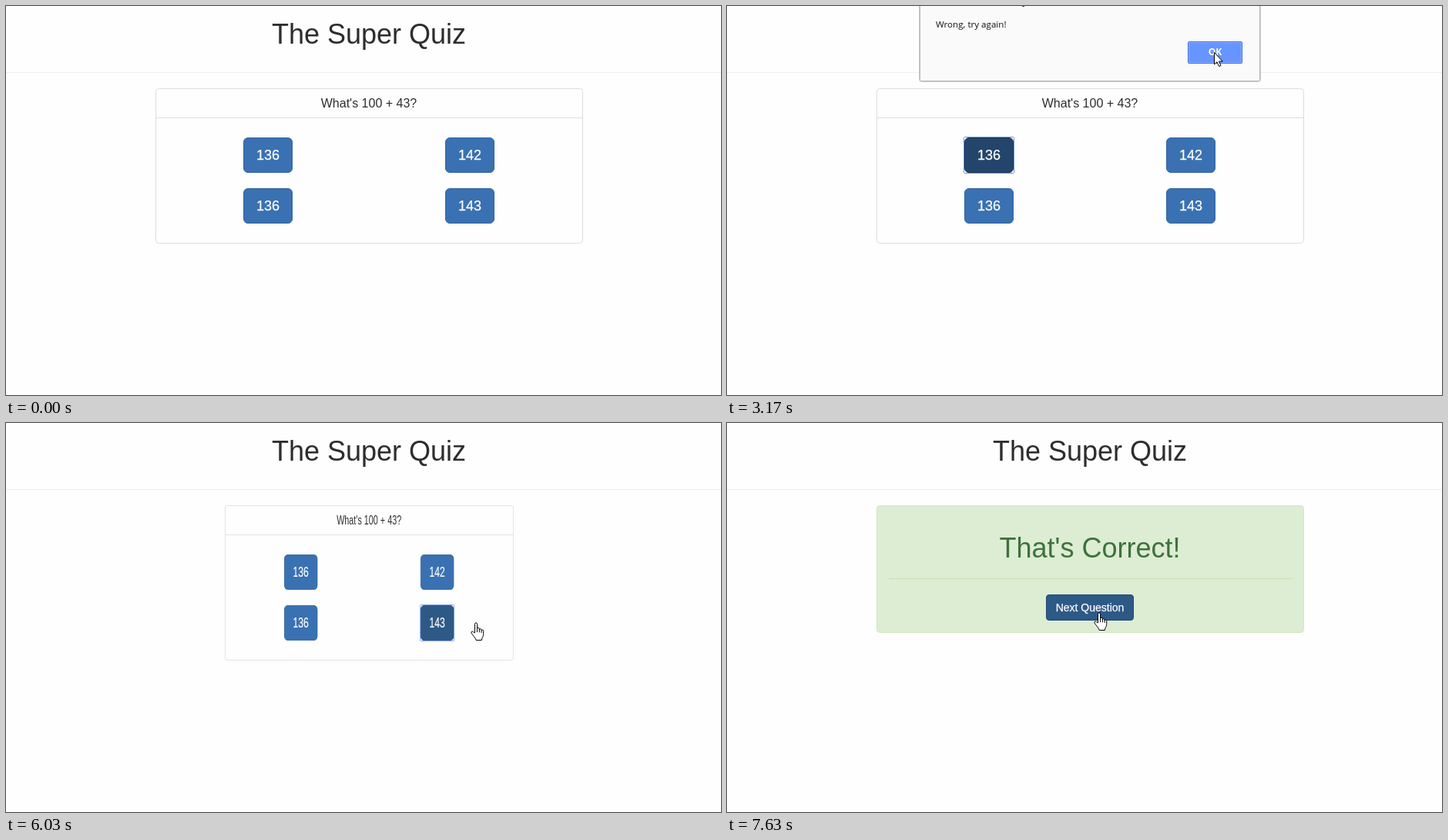
An HTML page that plays this animation: 928 px wide and 506 px high, repeating every 8 s.

```html
<!DOCTYPE html>
<html lang="en">
<head>
<meta charset="utf-8">
<title>Quiz</title>
<style>
  html, body { margin: 0; width: 100%; height: 100%; overflow: hidden; background: #fefefe; }
  svg { display: block; width: 928px; height: 506px; }
  text { font-family: "Liberation Sans", Arial, sans-serif; text-anchor: middle; fill: #2d2d2d; }
  .heading { font-size: 36px; }
  .face { fill: #3a71b2; stroke: #31659f; }
  .button text { fill: #fff; stroke: #fff; stroke-width: .25px; }
  .ring { display: none; fill: none; stroke: #6d97e6; }
  .hot .face { fill: #2d5987; stroke: #234a73; }
  .active .face { fill: #24456b; stroke: #1a3453; }
  .focus .ring { display: inline; }
  .line { fill: none; stroke: #ddd; }
  #dialog text { font-family: "Open Sans", "Noto Sans", sans-serif; fill: #111; }
  #cursor path { fill: #fff; stroke: #000; stroke-linejoin: round; }
</style>
</head>
<body>
<svg viewBox="0 0 928 506">
  <rect width="928" height="506" fill="#fefefe"/>
  <text class="heading" x="471" y="49">The Super Quiz</text>
  <path d="M0 86.5H928" stroke="#eee"/>

  <g id="front">
    <rect class="line" x="194.5" y="107.5" width="554" height="201" rx="4"/>
    <path class="line" d="M195 145.5H748"/>
    <text x="471" y="132" font-size="16">What's 100 + 43?</text>
  </g>

  <g id="back">
    <rect x="194.5" y="107.5" width="554" height="165" rx="4" fill="#dcedd3" stroke="#d3e6c1"/>
    <text class="heading" x="471" y="175" style="fill:#3f713c">That's Correct!</text>
    <path d="M210 202.5H734" stroke="#c8e1b0"/>
  </g>

  <g id="dialog">
    <rect x="249.5" y="-40" width="443" height="138.5" rx="3" fill="none" stroke="#000" stroke-opacity=".2"/>
    <rect x="250.5" y="-40" width="441" height="137.5" rx="2" fill="#fafafa" stroke="#b8b8b8"/>
    <text x="387" y="-3" font-size="15">y</text>
    <text x="271" y="28" font-size="11.6" style="text-anchor:start">Wrong, try again!</text>
    <rect x="598.5" y="46.5" width="70" height="28" rx="1" fill="#6695ff" stroke="#3f6fd9"/>
    <rect x="599.5" y="47.5" width="68" height="26" fill="none" stroke="#8aacff"/>
    <text x="633.5" y="64" font-size="12" font-weight="700" style="fill:#fff">OK</text>
  </g>

  <g id="cursor">
    <path id="arrow" d="M.5 .5V16L4 12.8L6.6 18.6L9 17.5L6.5 12H11.3Z"/>
    <path id="hand" transform="translate(-7 -1)" d="M5.5 14V2.4a1.5 1.5 0 0 1 3 0V8.5a1.4 1.4 0 0 1 2.8 .3V10a1.4 1.4 0 0 1 2.8 .3V11.3a1.3 1.3 0 0 1 2.6 .3V15.5c0 3.4-2 4.4-2.4 8H7.2c-.4-3-4.8-6.6-6.2-9.4c-.7-1.8 1.2-2.7 2.4-1.4ZM8.5 8.5V13M11.3 10V13.4M14.1 11.3V14"/>
  </g>
</svg>
<script>
const LOOP = 8000, STEP = 73, CENTER = 471.5;
const PRESS = 2140, DISMISS = 4030, ANSWER = 5740, FLIP = 5820, FLIP_TIME = 1157;

// Pointer gestures: time span, destination and how far the path bows out
const ENTRY = { x: 626, y: 408 };
const MOVES = [
  { from: 260, to: 700, x: 326, y: 190, bow: [-140, 0] },
  { from: 1230, to: 1830, x: 342, y: 199, bow: [6, 9] },
  { from: PRESS, to: 2360, x: 342, y: 199 },
  { from: 2510, to: 2940, x: 630, y: 68, bow: [64, -46] },
  { from: 3090, to: 3170, x: 632, y: 60 },
  { from: DISMISS, to: 4530, x: 450, y: 155, bow: [0, 12] },
  { from: 5070, to: 5810, x: 612, y: 260, bow: [20, 50] },
  { from: 5890, to: 6690, x: 591, y: 261 },
  { from: 6770, to: 7560, x: 483, y: 247 }
];

const $ = id => document.getElementById(id);
const clamp = v => Math.max(0, Math.min(1, v));
const smooth = k => k * k * (3 - 2 * k);
const between = (t, from, to) => t >= from && t < to;

function makeButton(parent, label, x, y, w, h, size, radius) {
  const node = document.createElementNS("http://www.w3.org/2000/svg", "g");
  node.innerHTML = `
    <rect class="face" x="${x + .5}" y="${y + .5}" width="${w - 1}" height="${h - 1}" rx="${radius}"/>
    <rect class="ring" x="${x - .5}" y="${y - .5}" width="${w + 1}" height="${h + 1}" rx="1"/>
    <text x="${x + w / 2}" y="${y + h / 2 + size / 3}" font-size="${size}">${label}</text>`;
  parent.append(node);
  const contains = p => between(p.x, x, x + w) && between(p.y, y, y + h);
  return { node, contains };
}

const answers = ["136", "142", "136", "143"].map((label, i) =>
  makeButton($("front"), label, i % 2 ? 570 : 308, i < 2 ? 171 : 237, 64, 46, 18, 5.5));
const next = makeButton($("back"), "Next Question", 414, 223, 114, 34, 14, 3.5);
const [wrong, , , right] = answers;

function setState(button, states) {
  const active = Object.keys(states).filter(name => states[name]);
  button.node.setAttribute("class", ["button", ...active].join(" "));
}

function show(node, visible) {
  node.setAttribute("display", visible ? "inline" : "none");
}

// The screen refreshes in even steps while something moves and rests in between
function snap(t, move) {
  if (!move) return 0;
  const span = move.to - move.from, steps = Math.round(span / STEP);
  const step = Math.floor((t - move.from) / span * steps + .15);
  return move.from + span * Math.min(1, step / steps);
}

function pointerAt(t, index) {
  if (index < 0) return ENTRY;
  const start = MOVES[index - 1] || ENTRY, move = MOVES[index];
  const [bowX, bowY] = move.bow || [0, 0];
  const k = smooth((t - move.from) / (move.to - move.from)), arc = Math.sin(Math.PI * k);
  return {
    x: Math.round(start.x + (move.x - start.x) * k + bowX * arc),
    y: Math.round(start.y + (move.y - start.y) * k + bowY * arc)
  };
}

// cubic-bezier(.25, .1, .25, 1)
function ease(x) {
  const curve = (s, a, b) => 3 * (1 - s) ** 2 * s * a + 3 * (1 - s) * s * s * b + s ** 3;
  let low = 0, high = 1;
  for (let i = 0; i < 24; i++) {
    const mid = (low + high) / 2;
    if (curve(mid, .25, .25) < x) low = mid; else high = mid;
  }
  return curve(low, .1, 1);
}

function flipTo(node, scale) {
  show(node, scale > .002);
  node.setAttribute("transform", `translate(${CENTER} 0) scale(${scale} 1) translate(${-CENTER} 0)`);
}

function render(time) {
  const index = MOVES.filter(move => move.from <= time).length - 1;
  const t = snap(time, MOVES[index]);
  const pointer = pointerAt(t, index);

  const turn = Math.cos(Math.PI * ease(clamp((t - FLIP) / FLIP_TIME)));
  flipTo($("front"), turn);
  flipTo($("back"), -turn);

  const hovered = (turn > 0 ? answers : [next]).find(button => button.contains(pointer));
  const focused = t >= ANSWER ? right : t >= PRESS ? wrong : null;
  const pressed = between(t, PRESS, DISMISS) ? wrong : between(t, ANSWER, 5890) ? right : null;
  for (const button of [...answers, next]) {
    setState(button, {
      hot: button === hovered || button === focused,
      active: button === pressed,
      focus: button === focused
    });
  }

  const drop = t < DISMISS ? clamp((t - PRESS + 40) / 250) : 1 - clamp((t - DISMISS) / 210);
  show($("dialog"), drop > 0);
  $("dialog").setAttribute("transform", `translate(0 ${Math.round(-100 * (1 - drop))})`);

  show($("cursor"), index >= 0);
  show($("hand"), hovered);
  show($("arrow"), !hovered);
  $("cursor").setAttribute("transform", `translate(${pointer.x} ${pointer.y})`);
}

const began = performance.now();
function tick() {
  render((performance.now() - began) % LOOP);
  requestAnimationFrame(tick);
}
tick();
</script>
</body>
</html>
```
